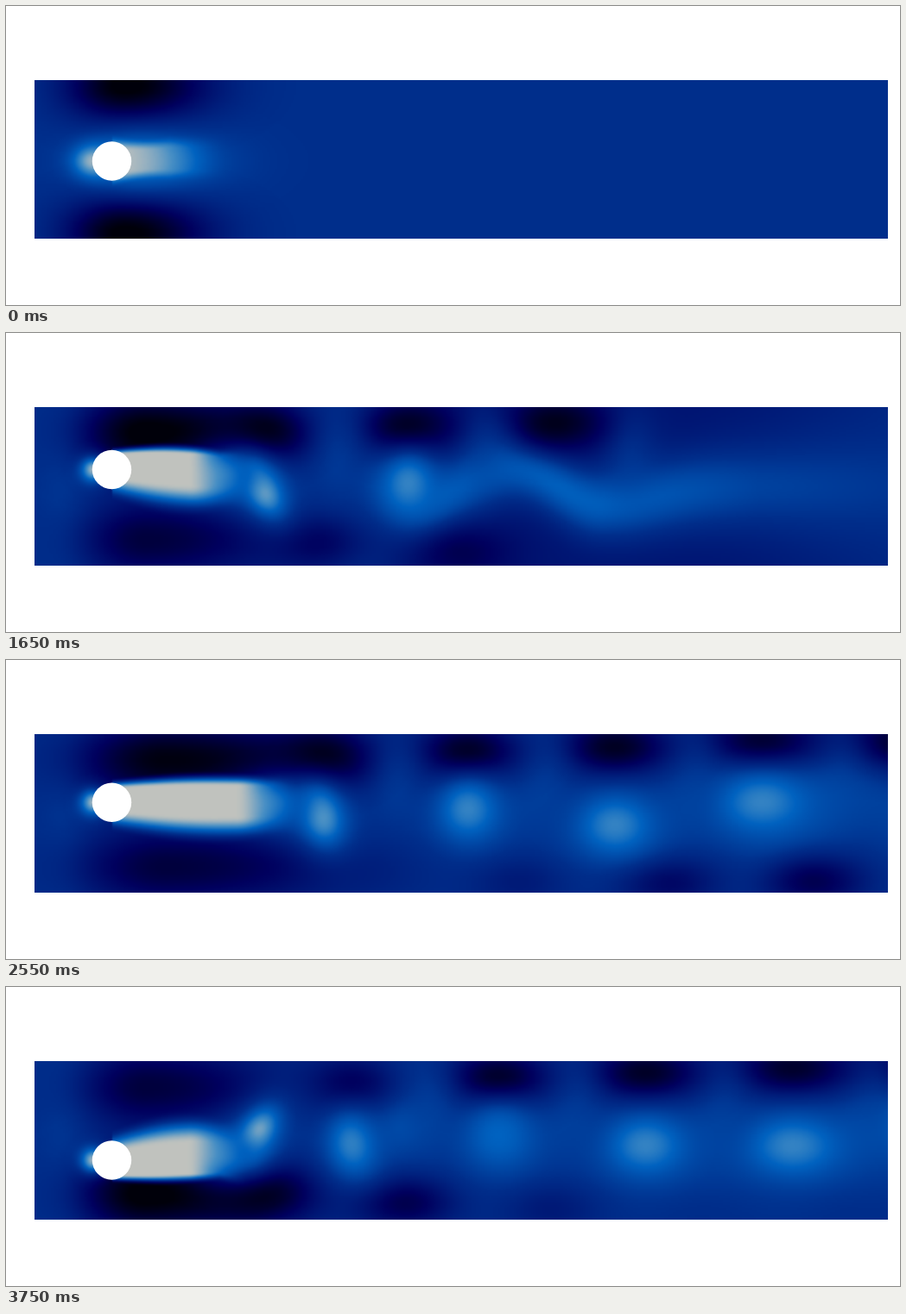
An HTML page with a canvas for the animation above (3.8 s loop, 1035 px wide and 347 px high).

```html
<!DOCTYPE html>
<html lang="en">
<head>
<meta charset="utf-8">
<title>Flow past a cylinder</title>
<style>
html, body { margin: 0; width: 100%; height: 100%; overflow: hidden; background: #fff; }
canvas { display: block; }
</style>
</head>
<body>
<canvas id="stage" width="1035" height="347"></canvas>
<script>
const LOOP = 3800, STEP = 50;
const LEFT = 33, TOP = 86, CELL = 2, COLS = 494, ROWS = 92;
const CX = 122.5, RADIUS = 22.7;
const SHED_X = 290, FIRST_SHED = 890, PERIOD = 374, SPEED = 0.455;

const ctx = document.getElementById('stage').getContext('2d');
const buffer = document.createElement('canvas');
buffer.width = COLS;
buffer.height = ROWS;
const bufferCtx = buffer.getContext('2d');
const image = bufferCtx.createImageData(COLS, ROWS);
const field = new Float32Array(COLS * ROWS);

const clamp = (v, lo, hi) => Math.min(hi, Math.max(lo, v));
const mix = (a, b, k) => a + (b - a) * k;
const smooth = (lo, hi, v) => {
  const k = clamp((v - lo) / (hi - lo), 0, 1);
  return k * k * (3 - 2 * k);
};

// Colour scale: level -1 is fast flow, 0 the undisturbed stream, 1 still fluid.
const SCALE = [
  [-1, 0, 0, 10], [-0.5, 0, 0, 94], [0, 0, 46, 139],
  [0.4, 0, 98, 192], [0.65, 72, 143, 196], [1, 226, 209, 188]
];
const palette = Array.from({ length: 512 }, (_, i) => {
  const level = i / 255.5 - 1;
  let n = 1;
  while (n < SCALE.length - 1 && SCALE[n][0] < level) n++;
  const a = SCALE[n - 1], b = SCALE[n];
  const k = clamp((level - a[0]) / (b[0] - a[0]), 0, 1);
  return [1, 2, 3].map(c => mix(a[c], b[c], k));
});

// Key points of the cylinder's swing, joined by a smooth curve.
const SWING = [[0, 180], [450, 176], [1250, 162], [1650, 158.5], [2250, 160], [2900, 174], [3750, 201]];
function cylinderY(t) {
  let i = 0;
  while (i < SWING.length - 2 && SWING[i + 1][0] < t) i++;
  const a = SWING[i], b = SWING[i + 1];
  const slope = (p, q) => (q[1] - p[1]) / (q[0] - p[0]);
  const span = b[0] - a[0], k = clamp((t - a[0]) / span, 0, 1);
  const ma = slope(SWING[i - 1] || a, b) * span;
  const mb = slope(a, SWING[i + 2] || b) * span;
  const bend = k * (1 - k);
  return mix(a[1], b[1], k * k * (3 - 2 * k)) + bend * ((1 - k) * ma - k * mb);
}
// 1 with the cylinder at its highest, -1 at its lowest.
const lift = t => clamp((179 - cylinderY(t)) / 21, -1, 1);

// Pulls the field towards a level inside a soft, optionally rotated ellipse.
function blob(x, y, rx, ry, level, weight = 1, angle = 0, leftRatio = 1) {
  if (weight <= 0) return;
  const reachX = 2.2 * (angle ? Math.max(rx, ry) : rx);
  const reachY = 2.2 * (angle ? Math.max(rx, ry) : ry);
  const i0 = Math.max(0, Math.floor((x - reachX - LEFT) / CELL));
  const i1 = Math.min(COLS, Math.ceil((x + reachX - LEFT) / CELL));
  const j0 = Math.max(0, Math.floor((y - reachY - TOP) / CELL));
  const j1 = Math.min(ROWS, Math.ceil((y + reachY - TOP) / CELL));
  const c = Math.cos(angle), s = Math.sin(angle);
  for (let j = j0; j < j1; j++) {
    const dy = TOP + (j + 0.5) * CELL - y;
    for (let i = i0; i < i1; i++) {
      const dx = LEFT + (i + 0.5) * CELL - x;
      const u = (dx * c + dy * s) / (dx < 0 ? rx * leftRatio : rx);
      const v = (dy * c - dx * s) / ry;
      const d = u * u + v * v;
      if (d > 4.8) continue;
      const n = j * COLS + i;
      field[n] += (level - field[n]) * weight * Math.exp(-d);
    }
  }
}

// For each column, shadeAt(x) gives a function from (y, level) to the new level.
function eachColumn(shadeAt) {
  for (let i = 0; i < COLS; i++) {
    const shade = shadeAt(LEFT + (i + 0.5) * CELL);
    if (!shade) continue;
    for (let j = 0; j < ROWS; j++) {
      const n = j * COLS + i;
      field[n] = shade(TOP + (j + 0.5) * CELL, field[n]);
    }
  }
}

// The first meander, carried downstream by the stream.
function meander(t) {
  const strength = smooth(450, 950, t) * (1 - smooth(2200, 2900, t));
  if (!strength) return;
  const swing = smooth(500, 1200, t);
  const front = 800 + 0.5 * (t - 1250);
  const spread = mix(20, 46, smooth(1100, 2250, t));
  const peak = mix(0.56, 0.26, smooth(1150, 2000, t));
  const surround = mix(-0.28, 0, smooth(1650, 2250, t));
  eachColumn(x => {
    const q = x - 515 - 0.44 * (t - 1250);
    const weight = strength * smooth(270, 340, x) * smooth(-300, -180, q) *
      (1 - smooth(front - 220, front + 180, x));
    if (!weight) return null;
    const centre = q < 0
      ? 176 + 22 * swing * Math.cos(q * 2 * Math.PI / 215)
      : 178 + 20 * swing * Math.exp(-((q / 90) ** 2));
    const width = (spread + clamp(q / 20, 0, 14)) * 1.25;
    const level = peak - clamp(q / 900, 0, 0.2);
    return (y, old) => {
      const g = Math.exp(-(((y - centre) / width) ** 2));
      return mix(old, mix(surround, level, g), weight);
    };
  });
}

// Bright core of an eddy; side is 1 for the upper row, -1 for the lower.
function core(age, y, level, weight, side) {
  const x = SHED_X + age, grown = clamp(age / 160, 0, 1);
  const angle = side * mix(1, Math.PI / 2, grown);
  const across = 17 + age * 0.045;
  blob(x + 4, y + 4 * side, 48, across * 1.9, 0.3, weight * 0.9, angle);
  blob(x, y, 29, across, mix(0.92, level, grown), weight, angle);
}

// Eddies leave the wake at a steady beat, the lower row between the upper ones.
function eddies(t) {
  for (let n = 0; FIRST_SHED + n * PERIOD < t + 150; n++) {
    const upper = FIRST_SHED + n * PERIOD, lower = upper + 0.65 * PERIOD;
    const age = SPEED * (t - upper), lowAge = SPEED * (t - lower);
    const weight = smooth(-50, 0, age), lowWeight = smooth(-60, -5, lowAge);
    const power = lift(upper), lowPower = smooth(0, 1, -lift(lower));

    const beat = 0.5 + 0.5 * Math.cos((lower - FIRST_SHED - 243) * 2 * Math.PI / 2600);
    blob(SHED_X + lowAge, 238 + clamp(lowAge / 15, 0, 18), 58, 32,
      mix(-0.6, -0.95, lowPower), lowWeight * beat);

    const old = clamp(age / 600, 0, 1);
    blob(SHED_X + age + 85, 138, 32, 55, 0.15, weight * 0.7);
    blob(SHED_X + age, mix(117, 95, old), 46 + age * 0.035, 32,
      mix(mix(-1, -0.82, old), -0.55, smooth(0, 0.7, -power)), weight);

    if (n) {
      const drift = 0.03 * Math.cos((n - 2) * 2.5);
      core(age, 179 + drift * age, mix(0.4, 0.58, smooth(0, 0.4, power)), weight, 1);
    }
    core(lowAge, 172 - 0.1 * lowAge, 0.4, lowWeight * lowPower, -1);
  }
}

// The wake first grows downstream, then pulses with each eddy it sheds.
function wakeShape(t) {
  const phase = ((t - FIRST_SHED) / PERIOD + 9) % 1;
  const shedding = smooth(450, 1150, t);
  const pulse = 58 * Math.sin(Math.PI * phase) ** 2 * smooth(-1, 0, lift(t));
  return {
    end: mix(190 + 0.4 * t, 247 + pulse, shedding),
    fade: mix(70 + 0.13 * t, 36, shedding),
    sway: -10 * Math.sin(2 * Math.PI * phase) * shedding
  };
}

function wake(t, cy, { end, fade, sway }) {
  const tip = 176 + (cy - 178) * 0.4;
  const bulge = mix(-4, 9, smooth(0, 900, t));
  blob(end + 12, tip + sway, 48, 30, 0.36, smooth(450, 1150, t));
  eachColumn(x => {
    if (x < CX || x > end + fade) return null;
    const u = (x - CX) / (end - CX);
    const centre = mix(cy, tip, Math.min(u, 1)) + sway * u ** 3;
    const half = 22 + bulge * Math.sin(Math.PI * 0.8 * Math.min(u, 1));
    const strength = 1 - smooth(end - fade, end + fade, x);
    return (y, old) => {
      const side = Math.sign(y - centre);
      const soft = 0.42 + 0.2 * side * lift(t);
      const edge = 1 - smooth(1 - soft, 1 + soft, Math.abs(y - centre) / half);
      return mix(old, 0.92, edge * strength);
    };
  });
}

function render(t) {
  const cy = cylinderY(t), up = lift(t), shape = wakeShape(t);
  const start = 1 - smooth(0, 400, t);
  const reach = shape.end - 100;

  field.fill(0);
  blob(70, 178, 28, 130, 0.1, 1 - start);
  meander(t);
  // Fast flow above and below the cylinder.
  for (const side of [-1, 1]) {
    const level = mix(-Math.max(0.7, 0.79 - 0.28 * side * up), -1.05, start);
    blob(100 + reach * 0.42, 178 + side * mix(62, 86, start), reach, mix(46, 42, start),
      level, 1, 0, mix(0.5, 0.72, start));
  }
  eddies(t);

  blob(150, cy, 92, 36, 0.5, start, 0, 0.7);
  wake(t, cy, shape);
  blob(101, cy, mix(15, 22, start), mix(15, 18, start), 0.85);

  for (let n = 0; n < field.length; n++) {
    const rgb = palette[clamp(Math.round((field[n] + 1) * 255.5), 0, 511)];
    image.data.set(rgb, n * 4);
    image.data[n * 4 + 3] = 255;
  }
  bufferCtx.putImageData(image, 0, 0);

  ctx.fillStyle = '#fff';
  ctx.fillRect(0, 0, 1035, 347);
  ctx.drawImage(buffer, LEFT, TOP, COLS * CELL, ROWS * CELL);
  ctx.beginPath();
  ctx.arc(CX, cy, RADIUS, 0, 2 * Math.PI);
  ctx.fill();
}

const begin = performance.now();
let shown = -1;
function tick() {
  const t = Math.floor((performance.now() - begin) % LOOP / STEP) * STEP;
  if (t !== shown) render(shown = t);
  requestAnimationFrame(tick);
}
tick();
</script>
</body>
</html>
```
